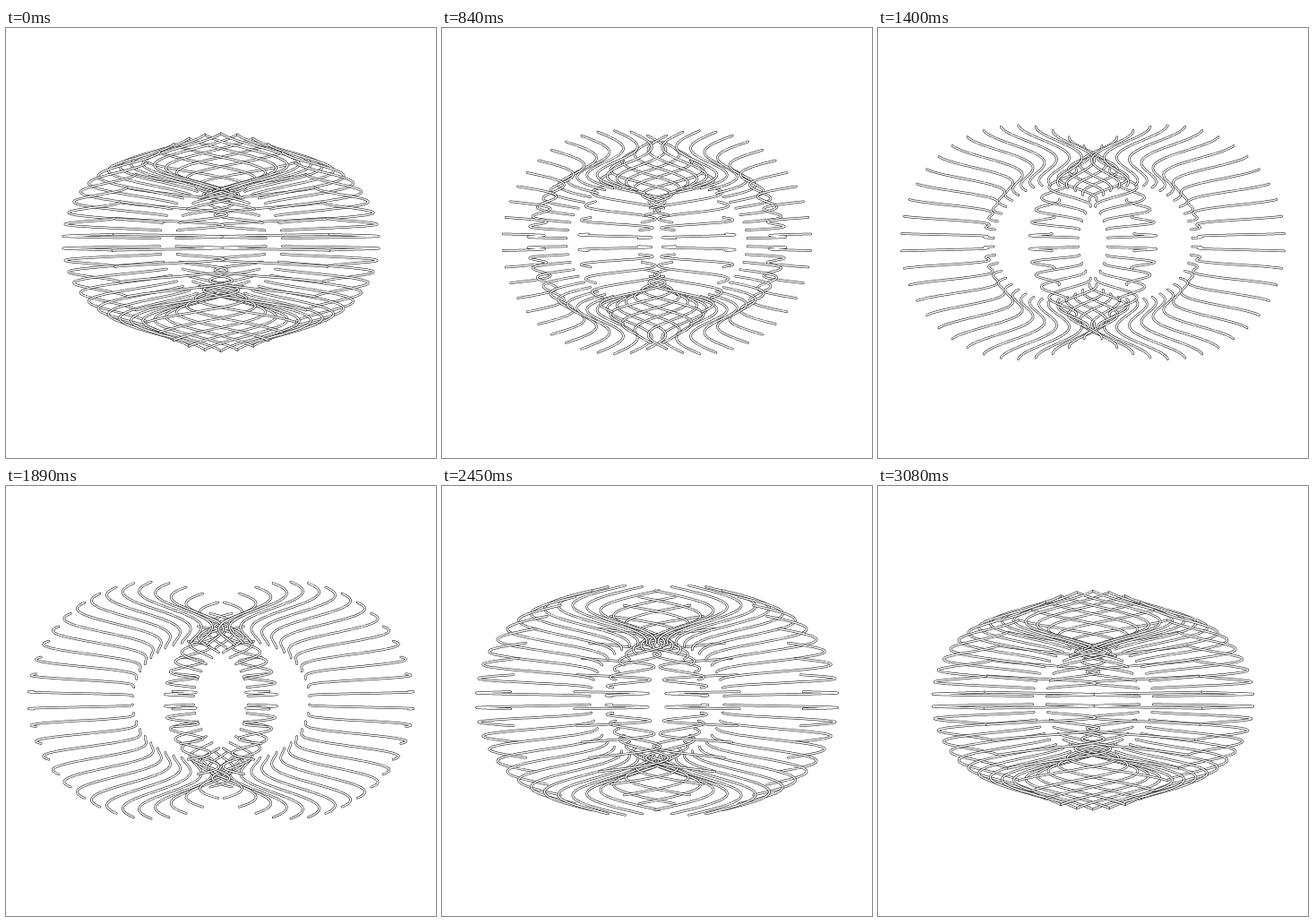
Recreate the animation shown at these times as an HTML page with a canvas. Size 480 px wide and 480 px high, loop 3.15 s.

```html
<!DOCTYPE html>
<html lang="en">
<head>
<meta charset="utf-8">
<title>Swaying threads</title>
<style>
  html, body { margin: 0; width: 100%; height: 100%; overflow: hidden; background: #fff; }
  canvas { display: block; width: 480px; height: 480px; }
</style>
</head>
<body>
<canvas id="stage" width="480" height="480"></canvas>
<script>
const ctx = document.getElementById('stage').getContext('2d');
const LOOP = 3150, STEP = 70;
const THREADS = 42, POINTS = 64;
const CX = 240, CY = 239.2;
const TAU = Math.PI * 2;

// Ring at depth s (0 near, 1 far): its sideways shift and radius.
function ring(s, phase) {
  const scale = 1 - 0.6 * s + 0.09 * s * s;
  const bulge = 37 * Math.sin(0.9 * Math.PI * s);
  const sway = 43 * (1 - Math.cos(phase - 5.7 * s));
  return {
    shift: -scale * (bulge + sway),
    radius: scale * (126.5 - 5.7 * Math.cos(phase - 0.46))
  };
}

function strokeThread(rings, angle, side) {
  const cos = Math.cos(angle), sin = Math.sin(angle);
  ctx.beginPath();
  for (const { shift, radius } of rings) {
    ctx.lineTo(CX + side * (shift + radius * cos), CY - radius * sin);
  }
  ctx.strokeStyle = '#000';
  ctx.lineWidth = 2.5;
  ctx.stroke();
  ctx.strokeStyle = '#fff';
  ctx.lineWidth = 1.5;
  ctx.stroke();
}

function draw(time) {
  const phase = TAU * time / LOOP;
  const rings = Array.from({ length: POINTS + 1 }, (_, i) => ring(i / POINTS, phase));
  ctx.fillStyle = '#fff';
  ctx.fillRect(0, 0, 480, 480);
  ctx.lineCap = ctx.lineJoin = 'round';
  for (let i = 0; i < THREADS; i++) {
    const angle = (i + 0.5) * TAU / THREADS;
    strokeThread(rings, angle, 1);
    strokeThread(rings, angle, -1);
  }
}

const start = performance.now();
function tick() {
  const time = (performance.now() - start) % LOOP;
  draw(Math.floor(time / STEP) * STEP);
  requestAnimationFrame(tick);
}
tick();
</script>
</body>
</html>
```
